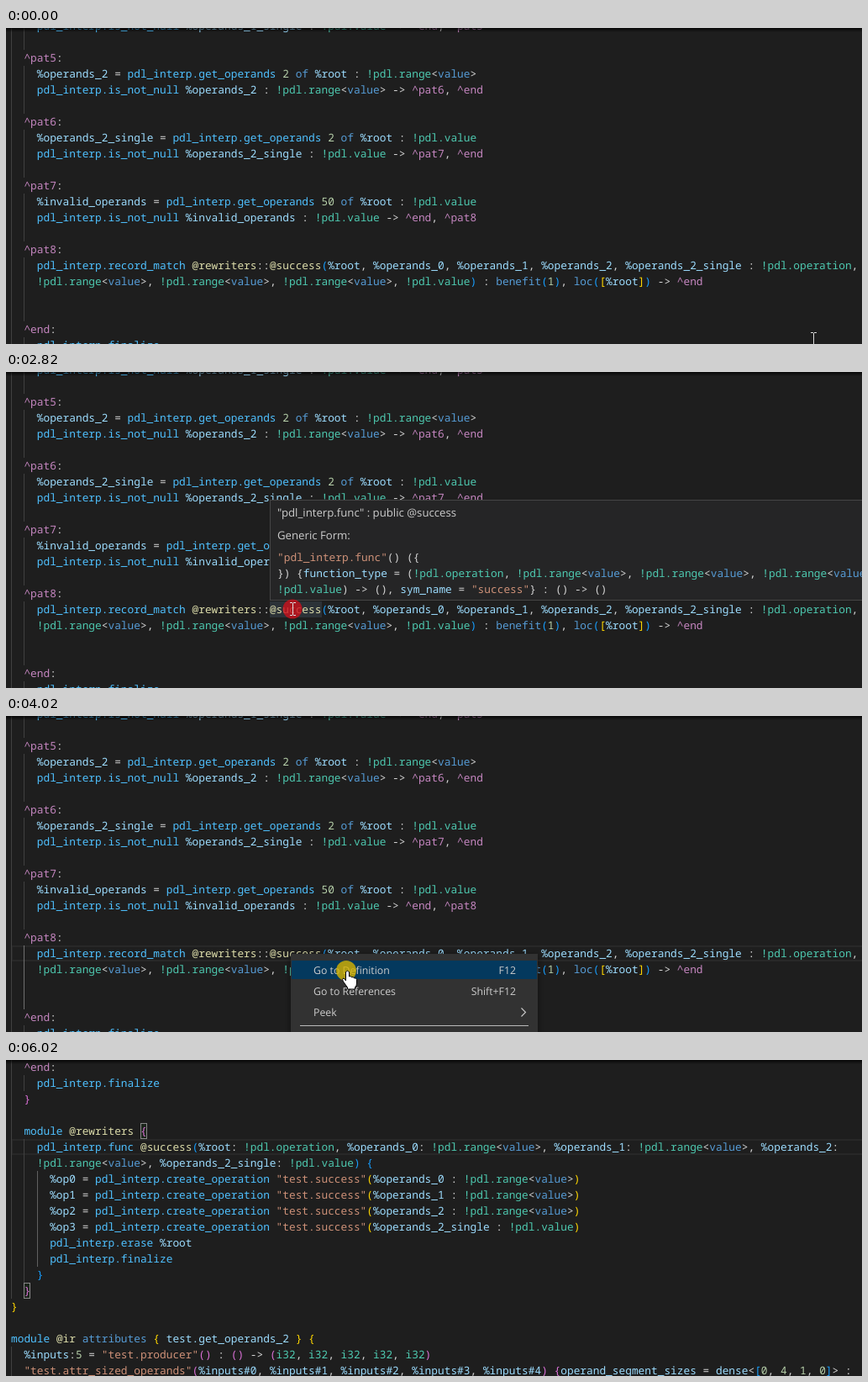
Recreate the animation shown at these times as an HTML page. Size 1019x376 px, loop 6.55 s.

```html
<!DOCTYPE html>
<html lang="en">
<head>
<meta charset="utf-8">
<title>Go to definition</title>
<style>
  html, body { margin: 0; width: 100%; height: 100%; overflow: hidden; background: #1e1e1e; }
  svg { display: block; width: 1019px; height: 376px; }
  .code { font-family: "Noto Sans Mono", monospace; font-size: 12.83px; text-rendering: geometricPrecision; }
  .ui { font-family: "Open Sans", sans-serif; font-size: 12.3px; text-rendering: geometricPrecision; }
</style>
</head>
<body>
<svg id="stage" viewBox="0 0 1019 376">
  <defs>
    <linearGradient id="shade" x2="0" y2="1">
      <stop stop-color="#000" stop-opacity=".75"/>
      <stop offset="1" stop-color="#000" stop-opacity="0"/>
    </linearGradient>
    <filter id="drop" x="-10%" y="-10%" width="120%" height="120%">
      <feDropShadow dx="0" dy="2" stdDeviation="4" flood-color="#000" flood-opacity=".45"/>
    </filter>
  </defs>
</svg>
<script>
const LOOP = 6550, CHAR = 7.697, ROW = 19, LEFT = 6;
const stage = document.getElementById('stage');

const BRACKETS = ['#ffd700', '#da70d6', '#179fff'];
const PLAIN = '#d4d4d4';
const RULES = [
  [/"[^"]*"/y, '#ce9178'],
  [/%\w+(#\d+)?/y, '#9cdcfe'],
  [/@\w+/y, '#dcdcaa'],
  [/\^\w+/y, '#c586c0'],
  [/![\w.]+|i32/y, '#4ec9b0'],
  [/pdl_interp\.\w+|module\b/y, '#4fc1ff'],
  [/(of|attributes|value|benefit|loc)\b/y, '#569cd6'],
  [/[a-z_][\w.]*/y, '#9cdcfe'],
  [/\d+/y, '#b5cea8'],
  [/[()[\]{}]/y, null],
  [/->|::|[<>=:,]/y, PLAIN]
];

const MATCH_PAGE = `    pdl_interp.is_not_null %operands_1_single : !pdl.value -> ^end, ^pat5

  ^pat5:
    %operands_2 = pdl_interp.get_operands 2 of %root : !pdl.range<value>
    pdl_interp.is_not_null %operands_2 : !pdl.range<value> -> ^pat6, ^end

  ^pat6:
    %operands_2_single = pdl_interp.get_operands 2 of %root : !pdl.value
    pdl_interp.is_not_null %operands_2_single : !pdl.value -> ^pat7, ^end

  ^pat7:
    %invalid_operands = pdl_interp.get_operands 50 of %root : !pdl.value
    pdl_interp.is_not_null %invalid_operands : !pdl.value -> ^end, ^pat8

  ^pat8:
    pdl_interp.record_match @rewriters::@success(%root, %operands_0, %operands_1, %operands_2, %operands_2_single : !pdl.operation,
    !pdl.range<value>, !pdl.range<value>, !pdl.range<value>, !pdl.value) : benefit(1), loc([%root]) -> ^end


  ^end:
    pdl_interp.finalize`;

const REWRITE_PAGE = `  ^end:
    pdl_interp.finalize
  }

  module @rewriters {
    pdl_interp.func @success(%root: !pdl.operation, %operands_0: !pdl.range<value>, %operands_1: !pdl.range<value>, %operands_2:
    !pdl.range<value>, %operands_2_single: !pdl.value) {
      %op0 = pdl_interp.create_operation "test.success"(%operands_0 : !pdl.range<value>)
      %op1 = pdl_interp.create_operation "test.success"(%operands_1 : !pdl.range<value>)
      %op2 = pdl_interp.create_operation "test.success"(%operands_2 : !pdl.range<value>)
      %op3 = pdl_interp.create_operation "test.success"(%operands_2_single : !pdl.value)
      pdl_interp.erase %root
      pdl_interp.finalize
    }
  }
}

module @ir attributes { test.get_operands_2 } {
  %inputs:5 = "test.producer"() : () -> (i32, i32, i32, i32, i32)
  "test.attr_sized_operands"(%inputs#0, %inputs#1, %inputs#2, %inputs#3, %inputs#4) {operand_segment_sizes = dense<[0, 4, 1, 0]> :`;

const HOVER_CODE = `"pdl_interp.func"() ({
}) {function_type = (!pdl.operation, !pdl.range<value>, !pdl.range<value>, !pdl.range<value>,
!pdl.value) -> (), sym_name = "success"} : () -> ()`;

function add(parent, tag, attrs = {}, text = '') {
  const el = document.createElementNS('http://www.w3.org/2000/svg', tag);
  for (const key in attrs) el.setAttribute(key, attrs[key]);
  el.textContent = text;
  return parent.appendChild(el);
}
const group = (parent, attrs) => add(parent, 'g', attrs);
const rect = (parent, x, y, width, height, fill, more) =>
  add(parent, 'rect', { x, y, width, height, fill, ...more });
const label = (parent, x, y, text, more) =>
  add(parent, 'text', { x, y, fill: '#ccc', class: 'ui', ...more }, text);

// depth is the bracket nesting at the first line; NaN leaves brackets plain
function code(parent, source, left, top, depth) {
  source.split('\n').forEach((line, row) => {
    const y = top + row * ROW + 14;
    const text = add(parent, 'text', { class: 'code', y });
    for (let col = 0; col < line.length;) {
      let token = line[col], fill = PLAIN;
      for (const [rule, color] of RULES) {
        rule.lastIndex = col;
        const found = rule.exec(line);
        if (!found) continue;
        token = found[0];
        if (color) fill = color;
        else {
          const level = '([{'.includes(token) ? depth++ : --depth;
          fill = BRACKETS[level % 3] || PLAIN;
        }
        break;
      }
      if (token !== ' ') add(text, 'tspan', { x: left + col * CHAR, y, fill }, token);
      col += token.length;
    }
  });
}

function guides(parent, list, fill = '#404040') {
  for (const [x, from, to] of list) rect(parent, x, from, 1, to - from, fill);
}
function currentLine(parent, top) {
  return rect(parent, 7, top + 1, 1020, 17, 'none', { stroke: '#282828', 'stroke-width': 2 });
}
function bracketBox(parent, x, y) {
  rect(parent, x + .5, y + .5, 7, 18, 'rgba(0,100,0,.1)', { stroke: '#888' });
}

// first page
const matchPage = group(stage);
const lineMark = group(matchPage);
currentLine(lineMark, 273);
guides(matchPage, [[6, 0, 376], [21, 0, 26], [21, 45, 102], [21, 121, 178],
  [21, 197, 254], [21, 273, 349], [21, 368, 376]]);
const activeGuide = group(matchPage);
guides(activeGuide, [[21, 273, 349]], '#707070');
const wordMark = rect(matchPage, 314, 273, 62, 19, '#2c3238');
code(matchPage, MATCH_PAGE, LEFT, -12, 2);

// second page
const rewritePage = group(stage);
currentLine(rewritePage, 94);
guides(rewritePage, [[6, 0, 284], [6, 341, 376], [21, 18, 37], [21, 94, 265]]);
guides(rewritePage, [[37, 132, 246]], '#606060');
const jumpMark = rect(rewritePage, 37, 94, 115, 19, '#613214');
const oldBracket = group(rewritePage);
bracketBox(oldBracket, 21, 37);
const newBrackets = group(rewritePage);
bracketBox(newBrackets, 160, 75);
bracketBox(newBrackets, 21, 265);
code(rewritePage, REWRITE_PAGE, LEFT, -1, 2);
const caret = rect(rewritePage, 36, 94, 2, 19, '#aeafad');

rect(stage, 0, 0, 1019, 5, 'url(#shade)');

// hover card
const card = group(stage);
rect(card, 314.5, 152.5, 720, 119, '#252526', { stroke: '#454545' });
label(card, 323, 172, '"pdl_interp.func" : public @success', { style: 'font-size:13.2px' });
label(card, 323, 199, 'Generic Form:', { style: 'font-size:13.2px' });
code(card, HOVER_CODE, 323, 211, NaN);

// context menu
const menu = group(stage);
rect(menu, 339, 283, 294, 140, '#303031', { filter: 'url(#drop)' });
const menuMark = rect(menu, 340, 291, 292, 22, '#04395e');
[['Go to Definition', 'F12'], ['Go to References', 'Shift+F12'], ['Peek', '']].forEach(([name, keys], i) => {
  label(menu, 366, 307 + i * 25, name);
  label(menu, 607, 307 + i * 25, keys, { 'text-anchor': 'end' });
});
add(menu, 'path', { d: 'M613.5 347.5l5 5-5 5', fill: 'none', stroke: '#ccc', 'stroke-width': 1.1 });
rect(menu, 350, 368, 272, 1, '#bbb');

// clicks and pointers
const redClick = add(stage, 'circle', { cx: 341, cy: 282, r: 11.5, fill: '#cc101c', opacity: .8 });
const goldClick = add(stage, 'circle', { cx: 405, cy: 303, r: 12, fill: '#d8b400', opacity: .8 });
const pointer = group(stage);
const beam = add(pointer, 'path', {
  d: 'M-3.5-7.5H-.5M.5-7.5H3.5M0-7V7M-3.5 7.5H-.5M.5 7.5H3.5', stroke: '#dcdcdc', fill: 'none'
});
const arrow = add(pointer, 'path', {
  d: 'M0 0V16.5L3.8 13 6.2 18.6 8.7 17.5 6.3 12H11.5Z', fill: '#fff', stroke: '#000'
});
const hand = add(pointer, 'path', {
  d: 'M-2 1.5Q0-1 2 1.5V7Q4 5.5 5 8 7 6.5 8 9 10.5 8 11 10.5V15Q11 18 9 20V22H0V20L-5 13Q-7 10-5 9-3.5 9-2 12Z',
  fill: '#fff', stroke: '#000'
});

// [element, visible from, visible until]
const SHOWN = [
  [matchPage, 0, 4560], [rewritePage, 4560, LOOP],
  [lineMark, 2890, 4560], [activeGuide, 2890, 4560],
  [wordMark, 1090, 2890], [card, 1090, 2890],
  [redClick, 2820, 3020], [menu, 3020, 4560], [menuMark, 3420, 4560],
  [goldClick, 4020, 4560], [jumpMark, 4560, 4890],
  [oldBracket, 4560, 4620], [newBrackets, 4620, LOOP],
  [caret, 4560, 5090, 5590, 6020],
  [beam, 0, 3020, 4560, 5960], [arrow, 3020, 3420], [hand, 3420, 4560]
];

const steps = (t, start, gap, count) =>
  Math.max(0, Math.min(count, Math.floor((t - start) / gap) + 1)) / count;
const smooth = u => u * u * (3 - 2 * u);
const curve = (u, a, b, c) => a.map((v, i) =>
  v * (1 - u) ** 2 + 2 * u * (1 - u) * b[i] + c[i] * u * u);

function pointerAt(t) {
  if (t < 760) return curve(smooth(steps(t, 70, 68.8, 10)), [961.5, 369.5], [600, 115], [341.5, 282]);
  if (t < 2820) return [342.5, 282];
  if (t < 4560) return curve(steps(t, 3290, 65, 6), [341.5, 282], [369, 289], [406, 303]);
  return curve(steps(t, 5360, 75, 8) ** 1.6, [407.5, 304], [600, 330], [934, 290]);
}

function draw(t) {
  for (const [el, ...spans] of SHOWN) {
    const on = spans.some((from, i) => i % 2 === 0 && t >= from && t < spans[i + 1]);
    el.setAttribute('visibility', on ? 'visible' : 'hidden');
  }
  const fade = t < 1155 ? .4 : t < 1220 ? .8 : 1;
  card.setAttribute('opacity', fade);
  const [x, y] = pointerAt(t);
  pointer.setAttribute('transform', `translate(${Math.floor(x) + .5} ${Math.round(y)})`);
}

const began = performance.now();
function frame() {
  draw((performance.now() - began) % LOOP);
  requestAnimationFrame(frame);
}
frame();
</script>
</body>
</html>
```
